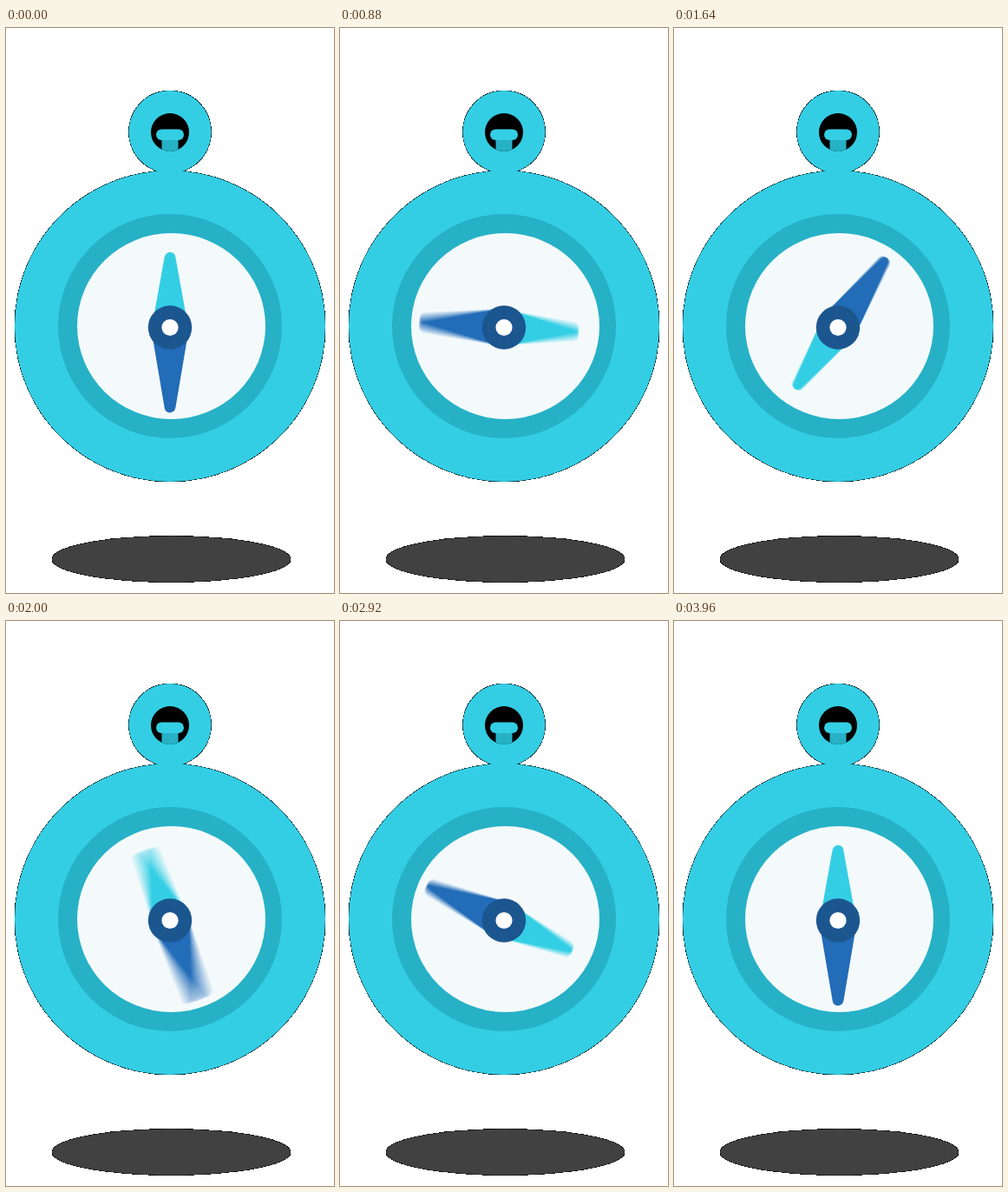
Animation, 378 px wide and 650 px high, one loop 4000 ms. Source, as an HTML page with a canvas:

```html
<!DOCTYPE html>
<html lang="en">
<head>
<meta charset="utf-8">
<title>Compass</title>
<style>
html, body { margin: 0; width: 100%; height: 100%; overflow: hidden; background: #fff; }
canvas { display: block; width: 378px; height: 650px; }
</style>
</head>
<body>
<canvas id="stage" width="378" height="650"></canvas>
<script>
const W = 378, H = 650, LOOP = 4000, STEP = 40;
const SHUTTER = 20, SAMPLES = 17;
const PIVOT = { x: 189, y: 344.5 };
const CYAN = '#34cee4', TEAL = '#26b1c6', BLUE = '#226cb8', NAVY = '#1c568f';

// Needle keys: time in ms, angle in degrees, speed in degrees per ms
const KEYS = [
  [0, 0, 0],
  [880, 453.5, 0.4],
  [1640, 575, 0.12],
  [2000, 700, 0.9],
  [2600, 1088.7, 0.4],
  [3320, 1317, 0.37],
  [3960, 1440, 0]
];

const ctx = document.getElementById('stage').getContext('2d');

function makeLayer() {
  const layer = document.createElement('canvas');
  layer.width = W;
  layer.height = H;
  return layer.getContext('2d');
}

const base = makeLayer();
const blur = makeLayer();

function disc(c, x, y, rx, ry, color) {
  c.fillStyle = color;
  c.beginPath();
  c.ellipse(x, y, rx, ry, 0, 0, Math.PI * 2);
  c.fill();
}

// Partly covered edge pixels turn solid and dark, the rest of the layer white
function hardenEdges(c) {
  const image = c.getImageData(0, 0, W, H), px = image.data;
  for (let i = 0; i < px.length; i += 4) {
    const alpha = px[i + 3] / 255;
    for (let k = 0; k < 3; k++) px[i + k] = alpha > 0.02 ? px[i + k] * alpha : 255;
    px[i + 3] = 255;
  }
  c.putImageData(image, 0, 0);
}

function paintBase() {
  const c = base;
  disc(c, 190.5, 611, 137.5, 26.5, '#414141');
  disc(c, 189, 119.5, 47.5, 47.5, CYAN);
  disc(c, 189, 343, 179, 179, CYAN);
  hardenEdges(c);

  disc(c, 189, 120, 22, 22, '#000');
  c.save();
  c.beginPath();
  c.arc(189, 120, 22, 0, Math.PI * 2);
  c.clip();
  c.fillStyle = TEAL;
  c.fillRect(179.5, 123, 19, 20);
  c.restore();
  c.fillStyle = CYAN;
  c.beginPath();
  c.roundRect(173, 116.5, 32, 12.5, 6.25);
  c.fill();

  disc(c, 189, 343, 129, 129, TEAL);
  disc(c, 190.5, 343, 108.5, 107, '#f4fafb');
}

function angleAt(time) {
  const t = Math.max(0, Math.min(3960, time));
  let i = 0;
  while (i < KEYS.length - 2 && t > KEYS[i + 1][0]) i++;
  const [t0, a0, v0] = KEYS[i], [t1, a1, v1] = KEYS[i + 1];
  const d = t1 - t0, s = (t - t0) / d, s2 = s * s, s3 = s2 * s;
  return a0 + (a1 - a0) * (3 * s2 - 2 * s3)
    + v0 * d * (s3 - 2 * s2 + s) + v1 * d * (s3 - s2);
}

// A tapered arm pointing up, with a round tip
function armPath(c, length, half, tip) {
  const y = -(length - tip);
  c.beginPath();
  c.moveTo(-half, 0);
  c.lineTo(-tip, y - 1);
  c.arc(0, y, tip, Math.PI + 0.17, -0.17);
  c.lineTo(half, 0);
  c.closePath();
}

// Coverage is summed over the shutter time, then tinted
function drawArm(time, turn, length, half, tip, color) {
  const c = blur;
  c.setTransform(1, 0, 0, 1, 0, 0);
  c.globalCompositeOperation = 'source-over';
  c.globalAlpha = 1;
  c.clearRect(0, 0, W, H);
  c.globalCompositeOperation = 'lighter';
  c.globalAlpha = 1 / SAMPLES;
  c.fillStyle = '#fff';
  for (let i = 0; i < SAMPLES; i++) {
    const at = time + SHUTTER * ((i + 0.5) / SAMPLES - 0.5);
    c.setTransform(1, 0, 0, 1, PIVOT.x, PIVOT.y);
    c.rotate((angleAt(at) + turn) * Math.PI / 180);
    armPath(c, length, half, tip);
    c.fill();
  }
  c.setTransform(1, 0, 0, 1, 0, 0);
  c.globalAlpha = 1;
  c.globalCompositeOperation = 'source-in';
  c.fillStyle = color;
  c.fillRect(0, 0, W, H);
  ctx.drawImage(c.canvas, 0, 0);
}

function draw(time) {
  ctx.drawImage(base.canvas, 0, 0);
  drawArm(time, 0, 86.5, 21, 6.3, CYAN);
  drawArm(time, 180, 98, 22, 6.3, BLUE);
  disc(ctx, PIVOT.x, PIVOT.y, 25.2, 25.2, NAVY);
  disc(ctx, PIVOT.x, PIVOT.y, 9.6, 9.6, '#fff');
}

const start = performance.now();
function tick() {
  const t = (performance.now() - start) % LOOP;
  draw(Math.floor(t / STEP) * STEP);
  requestAnimationFrame(tick);
}

paintBase();
tick();
</script>
</body>
</html>
```
